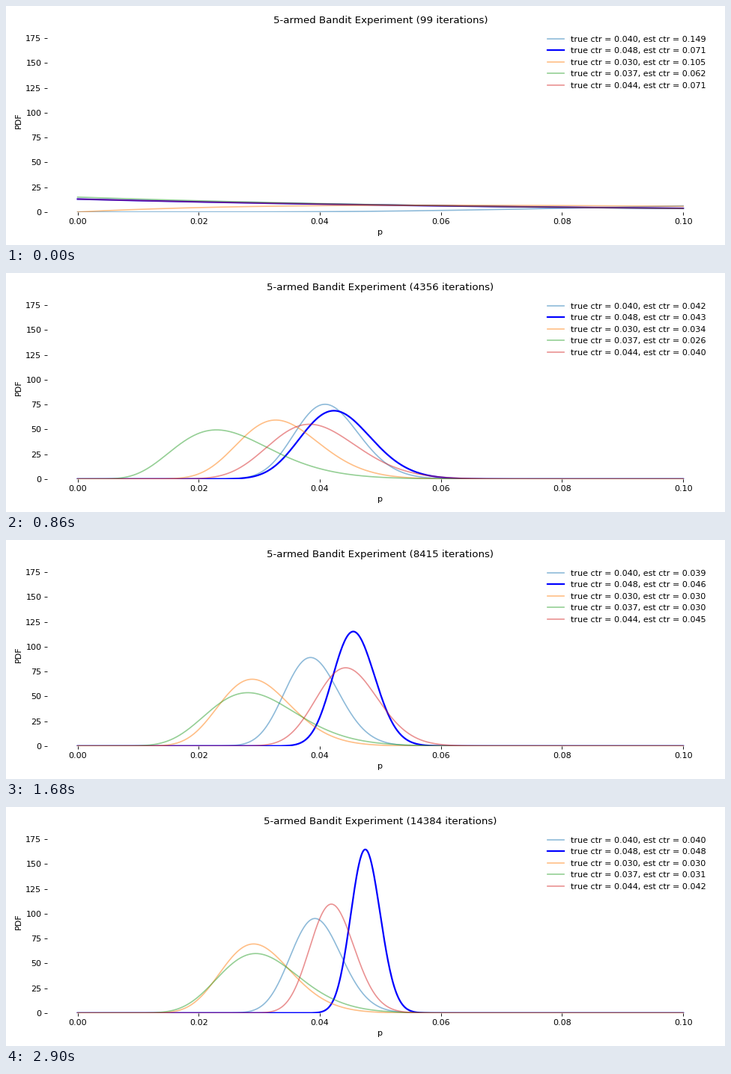
Animation, 960 px wide and 320 px high, one loop 2920 ms. Source, as a matplotlib script:

```python
from math import lgamma

import matplotlib.pyplot as plt
import numpy as np
from matplotlib.animation import FuncAnimation

W, H, DPI = 960, 320, 80
FRAMES, INTERVAL = 146, 20
STEP, LAST_ITER = 99, 14384

TRUE_CTR = [0.040, 0.048, 0.030, 0.037, 0.044]
COLORS = ["C0", "blue", "C1", "C2", "C3"]

# Checkpoints of the experiment: pulls and wins per arm.
MARKS = [0, 16, 43, 61, 84, 105, 145]
PULLS = np.array([
    [45, 12, 17, 14, 12],
    [541, 337, 373, 207, 226],
    [1395, 1205, 703, 349, 705],
    [1633, 2232, 760, 426, 1088],
    [1846, 3625, 798, 498, 1649],
    [1984, 4790, 819, 548, 2354],
    [2143, 7705, 860, 646, 3031],
])
WINS = np.array([
    [6, 0, 1, 0, 0],
    [20, 12, 12, 5, 5],
    [57, 51, 23, 8, 27],
    [63, 103, 23, 12, 42],
    [71, 165, 23, 14, 73],
    [76, 221, 25, 16, 104],
    [84, 366, 25, 19, 127],
])

x = np.linspace(1e-9, 0.1, 1000)


def beta_pdf(a, b):
    log_norm = lgamma(a + b) - lgamma(a) - lgamma(b)
    return np.exp(log_norm + (a - 1) * np.log(x) + (b - 1) * np.log1p(-x))


def posterior(frame, arm):
    """Beta parameters of one arm, starting from a uniform prior."""
    pulls = round(np.interp(frame, MARKS, PULLS[:, arm]))
    wins = round(np.interp(frame, MARKS, WINS[:, arm]))
    return 1 + wins, 1 + pulls - wins


plt.rcParams["font.family"] = "DejaVu Sans"
fig = plt.figure(figsize=(W / DPI, H / DPI), dpi=DPI, facecolor="white")
left, right, bottom, top = 55.2, 944.6, 44.2, 290.3
ax = fig.add_axes([left / W, bottom / H, (right - left) / W, (top - bottom) / H])
ax.set(xlim=(-0.005, 0.105), ylim=(0, 185), xlabel="p", ylabel="PDF",
       xticks=np.linspace(0, 0.1, 6), yticks=range(0, 176, 25))
ax.xaxis.set_major_formatter("{x:.2f}")
ax.spines[:].set_visible(False)
title = ax.set_title("", fontsize=12)

lines = []
for color in COLORS:
    best = color == "blue"
    line, = ax.plot(x, 0 * x, color=color, lw=2 if best else 1.5,
                    alpha=1 if best else 0.5, label="arm")
    lines.append(line)
legend = ax.legend(loc="upper right", frameon=False)


def update(frame):
    iters = min(STEP * (frame + 1), LAST_ITER)
    title.set_text(f"5-armed Bandit Experiment ({iters} iterations)")
    for arm, (line, label) in enumerate(zip(lines, legend.get_texts())):
        a, b = posterior(frame, arm)
        line.set_ydata(beta_pdf(a, b))
        label.set_text(f"true ctr = {TRUE_CTR[arm]:.3f}, est ctr = {a / (a + b):.3f}")
    return [title, legend, *lines]


anim = FuncAnimation(fig, update, frames=FRAMES, interval=INTERVAL,
                     repeat=True, repeat_delay=0, blit=False)
plt.show()
```
